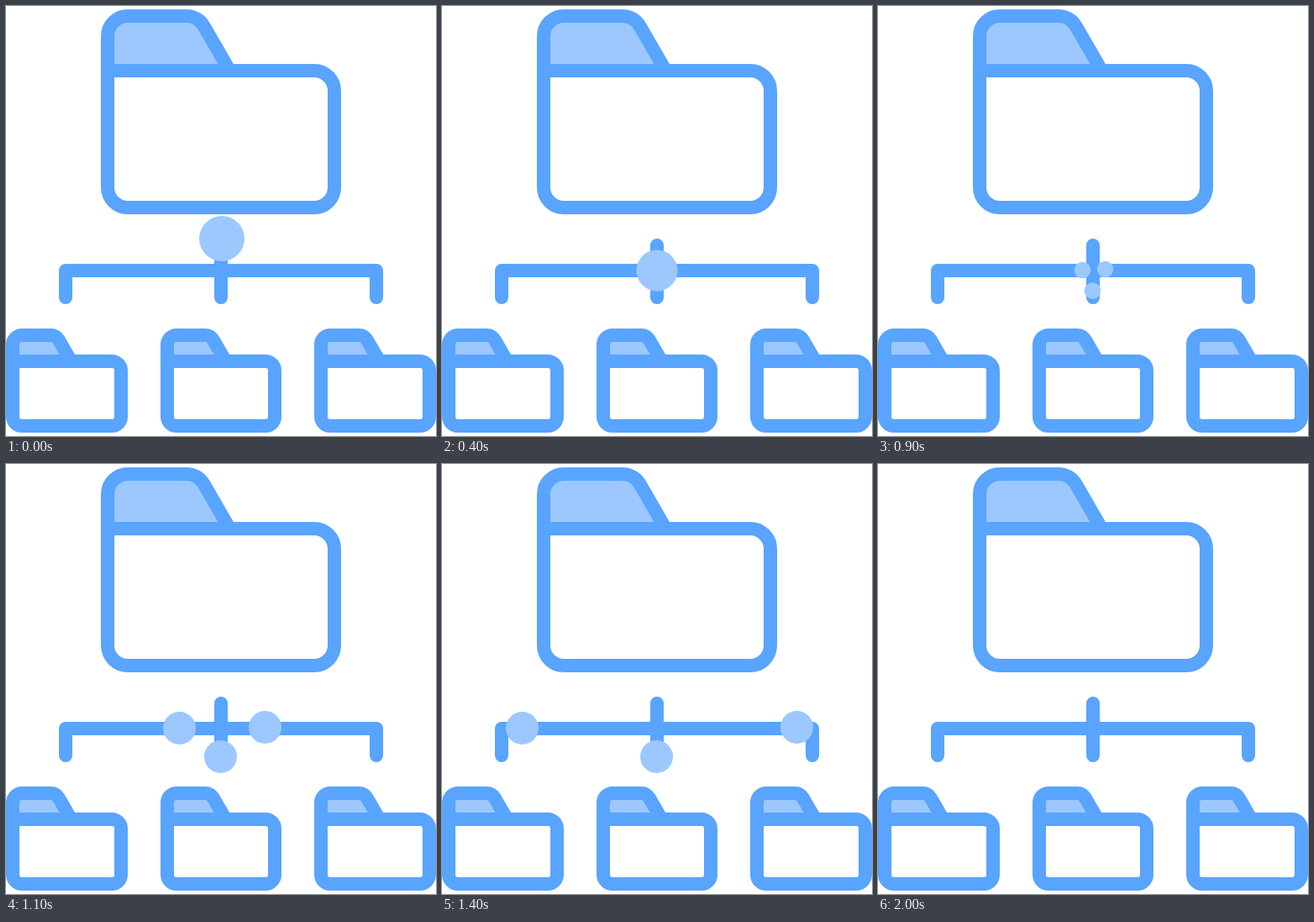
Recreate the animation shown at these times as an HTML page with a canvas. Size 512x512 px, loop 3600 ms.

```html
<!DOCTYPE html>
<html lang="en">
<head>
<meta charset="utf-8">
<title>Folder tree</title>
<style>
  html, body { margin: 0; width: 100%; height: 100%; overflow: hidden; background: #fff; }
  canvas { display: block; width: 100vmin; height: 100vmin; }
</style>
</head>
<body>
<canvas width="512" height="512"></canvas>
<script>
const ctx = document.querySelector('canvas').getContext('2d');
const BLUE = '#58a4ff', LIGHT = '#9cc8ff';
const LOOP = 3600, STEP = 100;
const SLOPE = Math.tan(Math.PI / 6);

const progress = (t, from, to) => Math.min(1, Math.max(0, (t - from) / (to - from)));
const easeOut = p => 1 - (1 - p) ** 3;

// Coordinates run along the middle of the outline; tabEnd is where the tab meets the bar.
function folder(left, top, right, bottom, bar, tabEnd, r) {
  const bendX = tabEnd - (bar - top - r / 2) * SLOPE;
  ctx.beginPath();
  ctx.moveTo(left, bar);
  ctx.arcTo(left, top, left + r, top, r);
  ctx.arc(bendX - r * Math.sin(Math.PI / 3), top + r, r, -Math.PI / 2, -Math.PI / 6);
  ctx.lineTo(tabEnd, bar);
  ctx.closePath();
  ctx.fillStyle = LIGHT;
  ctx.fill();
  ctx.stroke();

  ctx.beginPath();
  ctx.moveTo(left, bar);
  ctx.arcTo(right, bar, right, bottom, r);
  ctx.arcTo(right, bottom, left, bottom, r);
  ctx.arcTo(left, bottom, left, bar, r);
  ctx.closePath();
  ctx.stroke();
}

function smallFolder(index) {
  const shift = index * 183.6;
  const left = Math.round(8 + shift), right = Math.round(136.7 + shift);
  folder(left, 392, right, 500, 423, left + 69.5, 11);
}

function connector() {
  ctx.beginPath();
  ctx.moveTo(71, 347);
  ctx.lineTo(71, 315);
  ctx.lineTo(441, 315);
  ctx.lineTo(441, 347);
  ctx.moveTo(256, 285);
  ctx.lineTo(256, 347);
  ctx.stroke();
}

function ball(x, y, r) {
  ctx.beginPath();
  ctx.arc(x, y, r, 0, 2 * Math.PI);
  ctx.fillStyle = LIGHT;
  ctx.fill();
}

// One ball slides down to the junction and shrinks away.
function parentBall(t) {
  const p = progress(t, 0, 400);
  ball(257 - p, 277 + 38 * p, (27 - 2.5 * p) * (1 - progress(t, 400, 800)));
}

// Three balls grow, follow the branches and shrink at their ends.
function childBalls(t) {
  const r = 19.5 * progress(t, 800, 1000) * (1 - progress(t, 1600, 2000));
  const travel = Math.max(0, t - 1000);
  const drop = 35 * easeOut(progress(t, 1500, 1800));
  ball(Math.max(71.5, 243.5 - 0.37 * travel), 314.5 + drop, r);
  ball(Math.min(440.5, 270.5 + 0.38 * travel), 313.5 + drop, r);
  ball(255.5, 339 + 9.5 * progress(t, 1000, 1100), r);
}

function draw(t) {
  ctx.clearRect(0, 0, 512, 512);
  ctx.strokeStyle = BLUE;
  ctx.lineWidth = 16;
  ctx.lineCap = ctx.lineJoin = 'round';
  folder(121, 12, 391, 240, 77, 266.3, 24);
  for (let i = 0; i < 3; i++) smallFolder(i);
  connector();
  parentBall(t);
  childBalls(t);
}

const start = performance.now();
function tick() {
  const t = (performance.now() - start) % LOOP;
  draw(Math.floor(t / STEP) * STEP);
  requestAnimationFrame(tick);
}
tick();
</script>
</body>
</html>
```
